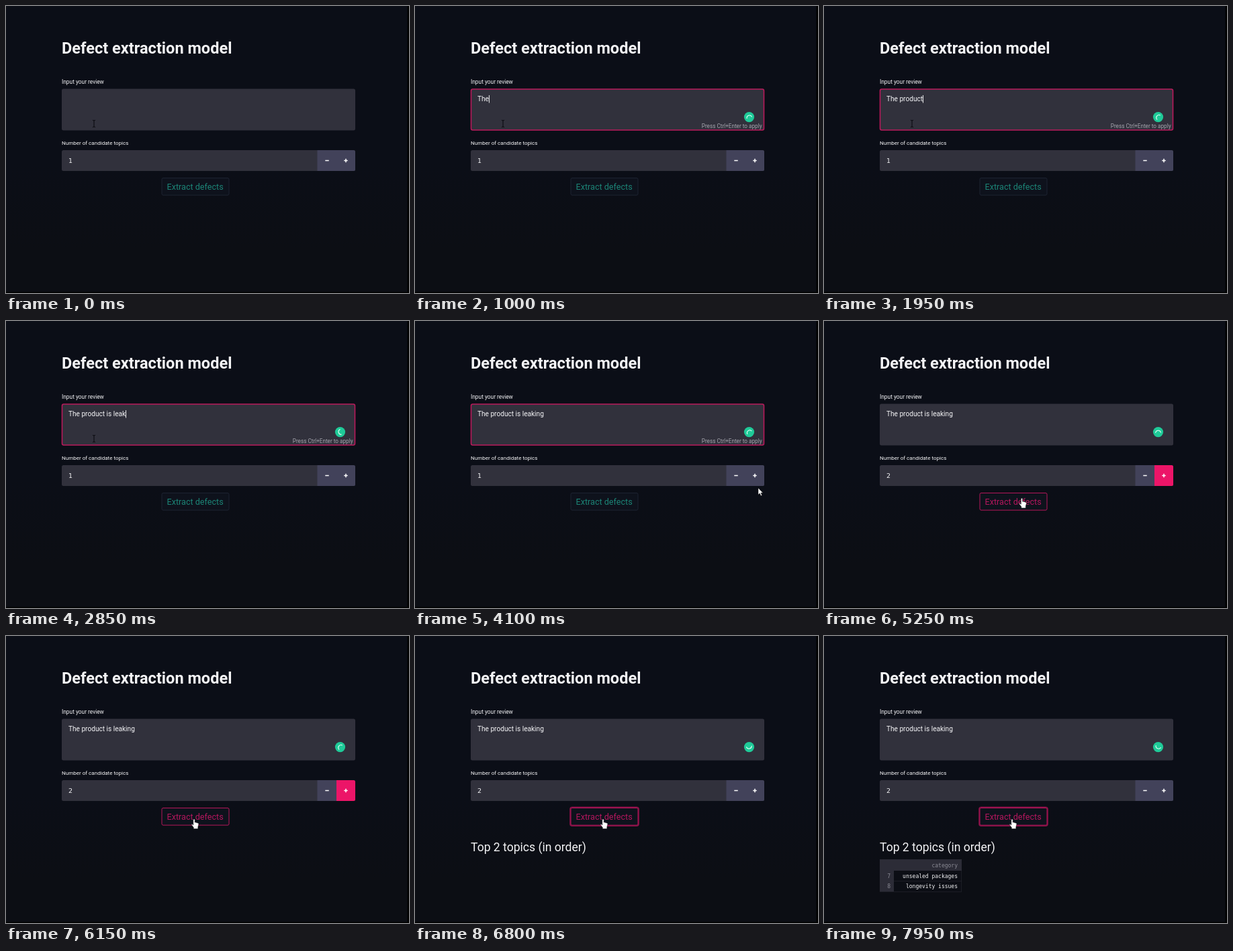
Animation of 600x428 px, one loop 8000 ms. Source, as an HTML page:

```html
<!DOCTYPE html>
<html lang="en">
<head>
<meta charset="utf-8">
<title>Defect extraction model</title>
<style>
  html, body { margin: 0; height: 100%; overflow: hidden; background: #000; }
  svg { display: block; width: 100vw; height: 100vh; }
  text { font-family: Roboto, sans-serif; fill: #f4f4f6; white-space: pre; }
  .mono { font: 500 8px "DejaVu Sans Mono", monospace; text-anchor: end; }
  .dim { fill: #8b8b95; }
  .field { fill: #31313c; }
  .step { fill: #42425a; }
</style>
</head>
<body>
<svg viewBox="0 0 600 428">
  <defs>
    <linearGradient id="page" x1="0" y1="0" x2="0" y2="1">
      <stop offset=".55" stop-color="#0b0e17"/>
      <stop offset=".85" stop-color="#0c0e14"/>
    </linearGradient>
  </defs>
  <rect width="597.5" height="426.5" fill="url(#page)"/>
  <text x="83" y="71" font-size="23.56" font-weight="700">Defect extraction model</text>

  <text x="83" y="116" font-size="8.33">Input your review</text>
  <rect class="field" x="83" y="123.5" width="437" height="62" rx="2.5"/>
  <rect id="focus" x="83.5" y="124" width="436" height="61" rx="2.5" fill="none" stroke="#b8195a" stroke-width="1.6"/>
  <text id="review" x="93" y="142.3" font-size="10.1"></text>
  <rect id="caret" y="133" width=".9" height="11.5" fill="#fff"/>
  <text id="hint" x="516.5" y="182" font-size="8.19" text-anchor="end" style="fill:#a5a5ae">Press Ctrl+Enter to apply</text>
  <g id="spinner" transform="translate(497.5 165.6)">
    <circle r="7.6" fill="#1fca98"/>
    <path id="arc" d="M-.7 -3.9A4 4 0 0 1 -.7 3.9" fill="none" stroke="#e4fff6" stroke-width="1.1" stroke-linecap="round"/>
  </g>

  <text x="83" y="207" font-size="8.05">Number of candidate topics</text>
  <rect class="field" x="83" y="215" width="437" height="31" rx="2.5"/>
  <path class="step" d="M463.5 215H492V246H463.5Z"/>
  <path id="plus" d="M492 215H517.5Q520 215 520 217.5V243.5Q520 246 517.5 246H492Z"/>
  <path d="M475.3 230.5H480.7M503.3 230.5H508.7M506 227.8V233.2" stroke="#fff" stroke-width="1.5"/>
  <text id="count" x="93" y="234" style="font:9.5px 'DejaVu Sans',sans-serif"></text>

  <rect id="ring" x="231" y="255.2" width="102" height="28" rx="3" fill="none" stroke="#8a1148" stroke-width="1.6"/>
  <rect id="button" x="232" y="256.5" width="100" height="25.6" rx="2" fill="#0e121c"/>
  <text id="label" x="239.5" y="273.6" font-size="12.6">Extract defects</text>

  <text id="heading" x="83" y="321" font-size="17.57">Top 2 topics (in order)</text>
  <g id="table">
    <path d="M83 333H205V381.5H83Z" fill="#2c2c37"/>
    <path d="M104 350H204.5V365.5H104ZM104 366H204.5V381H104Z" fill="#0c0e15"/>
    <text class="mono dim" x="199" y="344.5">category</text>
    <text class="mono dim" x="99" y="360.5">7</text>
    <text class="mono" x="199" y="360.5">unsealed packages</text>
    <text class="mono dim" x="99" y="376">8</text>
    <text class="mono" x="199" y="376">longevity issues</text>
  </g>

  <g id="pointer">
    <path id="beam" d="M-2 -5.2Q0 -5.2 0 -4Q0 -5.2 2 -5.2M0 -4V4M-2 5.2Q0 5.2 0 4Q0 5.2 2 5.2" fill="none" stroke="#08080c" stroke-width="1"/>
    <path id="arrow" d="M0 0V10L2.3 7.9L4 11.7L5.6 11L4 7.3H7Z" fill="#fff" stroke="#111" stroke-width=".5"/>
    <path id="hand" d="M-1.2 .8Q0 -.8 1.2 .8V5L2.7 4.8L3.2 5.4L4.6 5.2L5.1 6L6.4 6.1Q7 6.5 6.8 8L5.8 12V14.6H-.7V12.6L-3.6 8.8Q-4 7.4 -2.8 7.5L-1.2 9Z" fill="#fff" stroke="#111" stroke-width=".5" stroke-linejoin="round"/>
  </g>
</svg>
<script>
const LOOP = 8000;
const REVIEW = "The product is leaking";
const TYPE_START = 620, KEY_MS = 115;
const FOCUS = 250, INCREMENT = 4550, SUBMIT = 6250, HEADING = 6500, TABLE = 7250;

// Pointer stops: time, x, y
const PATH = [
  [3450, 131, 175.5], [3900, 520, 265], [4100, 511, 249], [4350, 506, 231],
  [4700, 506, 231], [5050, 297, 266], [5250, 294.5, 264.3], [5600, 287, 268], [5900, 280, 273]
];

const $ = id => document.getElementById(id);
const show = (id, on) => $(id).setAttribute("visibility", on ? "visible" : "hidden");
const inside = ([x, y], left, top, right, bottom) => x >= left && x <= right && y >= top && y <= bottom;

function pointerAt(t) {
  const next = PATH.findIndex(stop => stop[0] > t);
  if (next === 0) return PATH[0].slice(1);
  if (next < 0) return PATH[PATH.length - 1].slice(1);
  const [t0, x0, y0] = PATH[next - 1], [t1, x1, y1] = PATH[next];
  const p = (t - t0) / (t1 - t0), k = p * p * (3 - 2 * p);
  return [x0 + (x1 - x0) * k, y0 + (y1 - y0) * k];
}

function drawReview(t) {
  const typed = Math.max(0, Math.min(REVIEW.length, Math.floor((t - TYPE_START) / KEY_MS)));
  const focused = t >= FOCUS && t < INCREMENT;
  const lastKey = typed ? TYPE_START + typed * KEY_MS : FOCUS;
  $("review").textContent = REVIEW.slice(0, typed);
  $("caret").setAttribute("x", 93 + (typed ? $("review").getComputedTextLength() : 0));
  show("caret", focused && (t - lastKey) % 1000 < 500);
  show("focus", focused);
  show("hint", focused && typed > 0);
  show("spinner", t >= FOCUS);
  $("arc").setAttribute("transform", `rotate(${250 + (t - 1000) / 1050 * 360})`);
}

function drawControls(t, at) {
  const overPlus = inside(at, 492, 215, 520, 246);
  const overButton = inside(at, 232, 256, 332, 282);
  const overText = inside(at, 83, 123, 520, 186) || inside(at, 83, 215, 463, 246);
  const submitted = t >= SUBMIT;

  $("count").textContent = t < INCREMENT ? "1" : "2";
  $("plus").setAttribute("fill", overPlus || (t >= INCREMENT && !submitted) ? "#ec1568" : "#42425a");
  $("button").setAttribute("stroke", overButton ? "#b5175a" : "#1d2331");
  $("label").style.fill = overButton ? "#b5175e" : "#1c8577";
  show("ring", submitted);

  const shape = overPlus || overButton ? "hand" : overText ? "beam" : "arrow";
  for (const id of ["hand", "beam", "arrow"]) show(id, id === shape);
  $("pointer").setAttribute("transform", `translate(${at})`);
}

function draw(now) {
  const t = now % LOOP;
  drawReview(t);
  drawControls(t, pointerAt(t));
  show("heading", t >= HEADING);
  show("table", t >= TABLE);
}

const start = performance.now();
function tick() {
  draw(performance.now() - start);
  requestAnimationFrame(tick);
}
tick();
</script>
</body>
</html>
```
